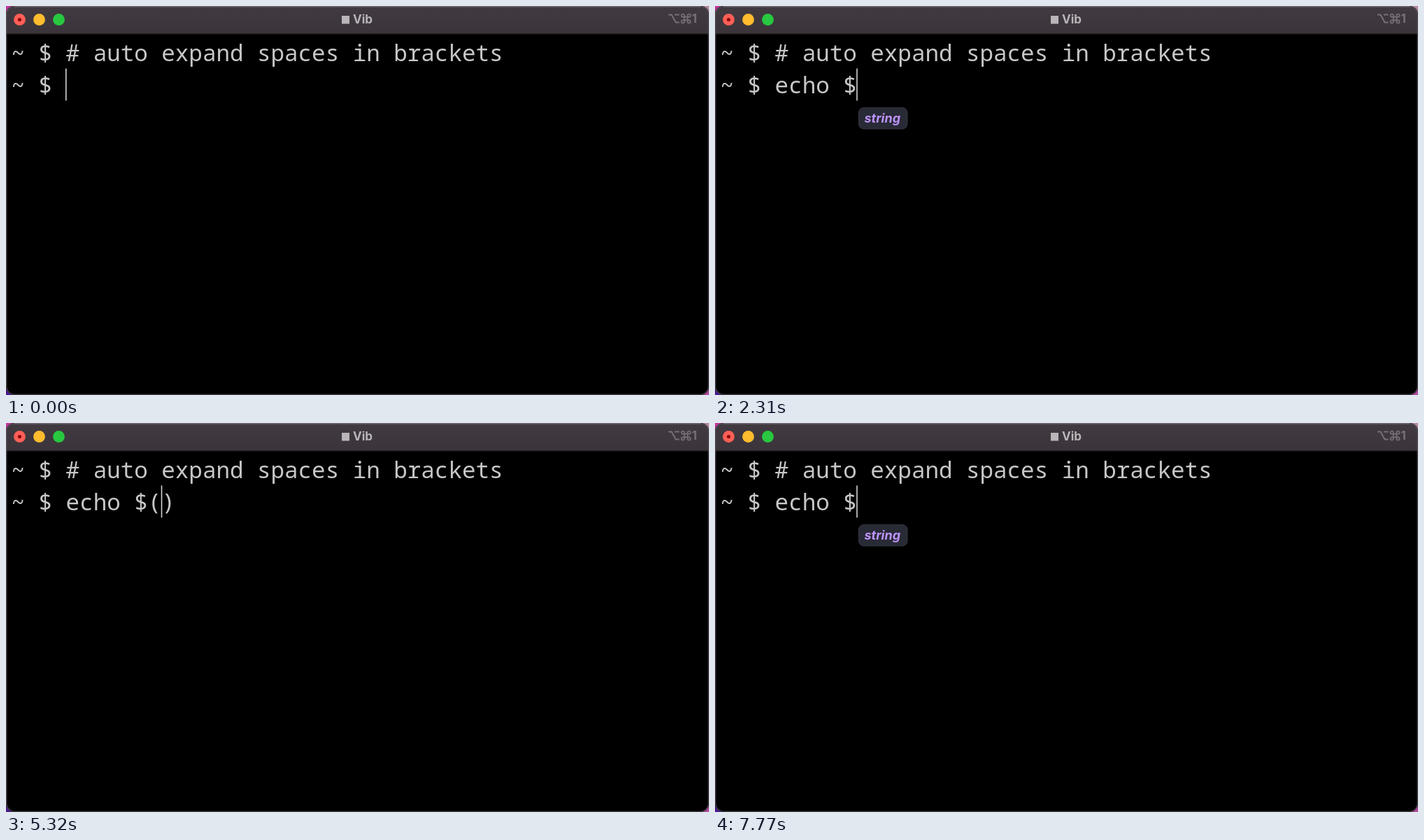
Write an HTML page that moves like this. It is 1005 by 557 pixels and loops after 8000 ms.

```html
<!DOCTYPE html>
<html lang="en">
<head>
<meta charset="utf-8">
<title>Terminal brackets</title>
<style>
  html, body { margin: 0; width: 100%; height: 100%; overflow: hidden; background: #000; }
  svg { display: block; width: 1005px; height: 557px; }
  text { white-space: pre; }
  .mono { font: 32.55px "Noto Sans Mono", "DejaVu Sans Mono", monospace; fill: #c7c7c7; }
  .ui { font-family: Inter, "Open Sans", sans-serif; }
  .hint { font-style: italic; fill: #bd93f9; }
</style>
</head>
<body>
<svg viewBox="0 0 1005 557">
  <defs>
    <linearGradient id="desk" x2="0" y2="1">
      <stop offset="0" stop-color="#c2399c"/>
      <stop offset="1" stop-color="#4b1a92"/>
    </linearGradient>
    <linearGradient id="deskRight" x2="0" y2="1">
      <stop offset="0" stop-color="#b58a9c"/>
      <stop offset="1" stop-color="#b04a9c"/>
    </linearGradient>
    <linearGradient id="bar" x2="0" y2="1">
      <stop offset="0" stop-color="#413a41"/>
      <stop offset="1" stop-color="#3b353b"/>
    </linearGradient>
    <clipPath id="window"><rect width="1005" height="557" rx="12"/></clipPath>
    <clipPath id="panel"><rect x="186.5" y="146" width="490" height="58.5" rx="6"/></clipPath>
    <clipPath id="small"><rect x="180" y="140" width="78" height="38.5"/></clipPath>
  </defs>

  <rect width="500" height="557" fill="url(#desk)"/>
  <rect x="500" width="505" height="557" fill="url(#deskRight)"/>
  <g clip-path="url(#window)">
    <rect width="1005" height="557"/>
    <rect width="1005" height="39" fill="url(#bar)"/>
    <rect y="39" width="1005" height="1.5" fill="#272327"/>
  </g>
  <rect x=".75" y=".75" width="1003.5" height="555.5" rx="11.5" fill="none" stroke="#555157" stroke-width="1.2"/>
  <path d="M12 .8H993" stroke="#797379" stroke-width="1.2"/>

  <circle cx="19.5" cy="19.5" r="8.4" fill="#ff5f57"/>
  <circle cx="19.5" cy="19.5" r="2.6" fill="#8c0b08"/>
  <circle cx="47.5" cy="19.5" r="8.4" fill="#febc2e"/>
  <circle cx="75.5" cy="19.5" r="8.4" fill="#28c840"/>

  <rect x="480" y="14" width="11" height="11.5" fill="#b9b5b9"/>
  <text class="ui" x="496" y="25" font-size="17" font-weight="700" fill="#b9b5b9">Vib</text>
  <g fill="none" stroke="#777177" stroke-width="2">
    <path d="M947 12.5h4.5l6 11h5M956 12.5h6.5"/>
    <path d="M969.8 15.7h4.6v4.6h-4.6zM969.8 15.7h-2.1a2.1 2.1 0 1 1 2.1-2.1zM974.4 15.7v-2.1a2.1 2.1 0 1 1 2.1 2.1zM974.4 20.3h2.1a2.1 2.1 0 1 1-2.1 2.1zM969.8 20.3v2.1a2.1 2.1 0 1 1-2.1-2.1z" stroke-width="1.7"/>
  </g>
  <text class="ui" x="980.5" y="24" font-size="17" font-weight="700" fill="#777177">1</text>

  <text class="mono" x="7.5" y="78.5">~ $ # auto expand spaces in brackets</text>
  <text class="mono" x="7.5" y="124.5" id="line">~ $ </text>
  <rect id="cursor" x="85" y="89.5" width="1.6" height="46" fill="#d2d2d2"/>

  <g id="options" display="none">
    <g clip-path="url(#panel)">
      <rect x="186" y="146" width="491" height="59" fill="#282a36"/>
      <rect x="186" y="146" width="491" height="30" fill="#45475a"/>
    </g>
    <rect x="186.2" y="145.8" width="490.5" height="59" rx="6" fill="none" stroke="#35363f"/>
    <rect x="194" y="150" width="21" height="21" rx="5" fill="#57cb5b"/>
    <text class="ui" x="204.5" y="167" font-size="17" font-weight="500" fill="#e4ffe4" text-anchor="middle">?</text>
    <text x="222.5" y="166.5" font-size="17.3" fill="#fff" font-family="DejaVu Sans Mono, monospace">-n</text>
    <text class="ui hint" x="194" y="196" font-size="17.4" font-weight="500">Do not print the trailing newline character</text>
    <g class="hint" font-weight="500">
      <text class="ui" x="634.5" y="195" font-size="13">(</text>
      <text x="639.5" y="195" font-size="13" font-family="DejaVu Sans, sans-serif">⌘</text>
      <text class="ui" x="652.5" y="195" font-size="13">i)</text>
    </g>
  </g>
  <g id="argument" display="none">
    <rect x="205.5" y="145.7" width="69.5" height="30.3" rx="7" fill="#282a36" stroke="#35363f"/>
    <text class="ui hint" x="213.5" y="166.5" font-size="18" font-weight="700">string</text>
  </g>
</svg>
<script>
  const LOOP = 8000, LEFT = 85, CELL = 19.53;
  const PROMPT = "~ $ ";

  // time, command with | as the cursor, popup
  const steps = [
    [0, "|"],
    [1330, "e|"],
    [1400, "ec|"],
    [1540, "echo|"],
    [1750, "echo |"],
    [1820, "echo |", "options"],
    [2030, "echo $|", "options"],
    [2100, "echo $|", "argument"],
    [2660, "echo $(|)"],
    [3010, "echo $( | )"],
    [3920, "echo $(|)"],
    [4410, "echo $( | )"],
    [5320, "echo $(|)"],
    [5810, "echo $()|"],
    [6020, "echo $(|"],
    [6230, "echo $|"],
    [6300, "echo $|", "argument"],
    [6580, "echo |", "small"],
    [6650, "echo |", "options"],
    [7350, "echo $|", "options"],
    [7420, "echo $|", "argument"]
  ];

  const [line, cursor, options, argument] =
    ["line", "cursor", "options", "argument"].map(id => document.getElementById(id));
  const show = (node, on) => node.setAttribute("display", on ? "inline" : "none");
  const start = performance.now();
  let current;

  function render([, command, popup]) {
    line.textContent = PROMPT + command.replace("|", "");
    cursor.setAttribute("x", LEFT + command.indexOf("|") * CELL);
    show(options, popup === "options" || popup === "small");
    show(argument, popup === "argument");
    options.setAttribute("clip-path", popup === "small" ? "url(#small)" : "none");
  }

  function tick() {
    const time = (performance.now() - start) % LOOP;
    const step = steps.findLast(([at]) => at <= time);
    if (step !== current) render(current = step);
    requestAnimationFrame(tick);
  }
  tick();
</script>
</body>
</html>
```
